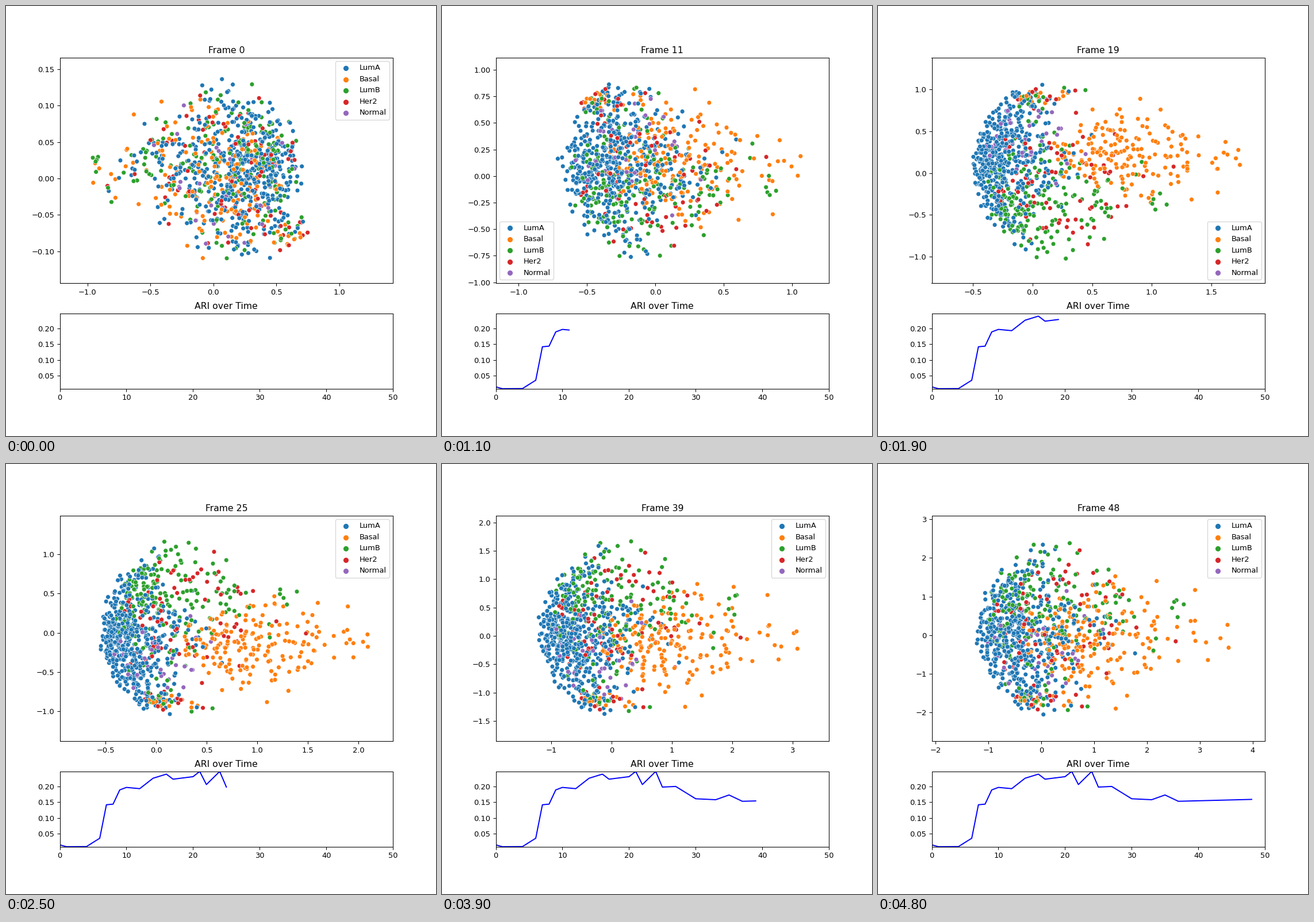
A matplotlib script that plays this animation: 748 by 748 pixels, repeating every 4.9 s.

```python
import numpy as np
import matplotlib.pyplot as plt
from matplotlib.animation import FuncAnimation

FRAMES = 49
NAMES = ["LumA", "Basal", "LumB", "Her2", "Normal"]

# Turning points of the score curve
ARI_EPOCH = [0, 1, 4, 6, 7, 8, 9, 10, 12, 14, 16, 17, 20, 21, 22, 24, 25, 27, 30, 33, 35, 37, 48]
ARI_SCORE = [.015, .0092, .0095, .036, .142, .144, .189, .197, .193, .226, .239, .223,
             .231, .2475, .206, .2475, .198, .2, .161, .158, .173, .153, .159]
ari = np.interp(np.arange(FRAMES), ARI_EPOCH, ARI_SCORE)

# View of the scatter plot at a few epochs
VIEW_EPOCH = [0, 11, 19, 25, 33, 39, 48]
LEFT = [-1.219, -1.168, -0.845, -0.952, -1.527, -1.92, -2.071]
RIGHT = [1.425, 1.272, 1.949, 2.342, 2.941, 3.607, 4.236]
BOTTOM = [-0.144, -1.01, -1.32, -1.38, -1.792, -1.859, -2.751]
TOP = [0.166, 1.114, 1.382, 1.49, 1.797, 2.122, 3.097]

HUB_Y = 0.49
MIXED = np.array([0.13, 0.155])  # spread of a class before it separates

rng = np.random.default_rng(7)


class Cloud:
    """Points around a home, in fractions of the view; grip < 1 resists mixing."""

    def __init__(self, labels, home, spread, grip=1.0):
        self.labels = labels
        self.home, self.spread, self.grip = np.array(home), np.array(spread), grip
        u, v = rng.standard_normal((2, len(labels)))
        # Sharp left edge, long right tail, narrowing towards the sides
        self.z = np.column_stack([u + 0.15 * (u**2 - 1), v * (1.2 - 0.25 * np.abs(u))])

    def points(self, hub, pull, noise):
        p = pull**self.grip
        z = self.z + 0.07 * noise.standard_normal(self.z.shape)
        return hub + p * (self.home - hub) + z * (MIXED + p * (self.spread - MIXED))


clouds = [
    Cloud([0] * 484, (0.21, 0.55), (0.08, 0.155)),
    Cloud([1] * 176, (0.61, 0.57), (0.14, 0.09)),
    Cloud([2] * 182, (0.32, 0.37), (0.10, 0.14)),
    Cloud([3] * 70, (0.39, 0.44), (0.12, 0.13)),
    Cloud([4] * 36, (0.28, 0.64), (0.10, 0.09)),
    # Small side group with members of every class
    Cloud(rng.choice(4, 50), (0.30, 0.87), (0.06, 0.035), grip=0.1),
]
labels = np.concatenate([c.labels for c in clouds])
order = rng.permutation(len(labels))


def layout(i):
    """Point positions as fractions of the view."""
    hub = np.array([np.interp(i, [11, 19], [0.54, 0.36]), HUB_Y])
    pull = np.interp(i, [0, 11, 19, 26, 48], [0.15, 0.5, 1, 1, 0.62])
    noise = np.random.default_rng(100 + i)
    d = np.vstack([c.points(hub, pull, noise) for c in clouds]) - 0.5

    # Pull stray points softly inside the view
    r = np.hypot(*d.T)[:, None]
    d /= (1 + (r / 0.47)**4)**0.25

    # The sign of each axis is arbitrary and flips between epochs
    if i < 5:
        d[:, 0] *= -1
    if i < 5 or 22 <= i < 29 or i >= 36:
        d[:, 1] *= -1
    return d + 0.5


def legend_loc(i):
    if 7 <= i < 15:
        return "lower left"
    return "lower right" if 15 <= i < 22 else "upper right"


fig, (ax, ax_ari) = plt.subplots(
    2, 1, figsize=(8, 8), dpi=93.5, gridspec_kw={"height_ratios": [3, 1]})
dots = ax.scatter(*np.zeros((2, len(order))), s=36, c=[f"C{k}" for k in labels[order]],
                  edgecolors="white", linewidths=0.48)
for k, name in enumerate(NAMES):
    ax.scatter([], [], color=f"C{k}", label=name)
legend = ax.legend(loc="upper right")
title = ax.set_title("Frame 0")

line, = ax_ari.plot([], [], color="blue")
ax_ari.set(xlim=(0, 50), ylim=(ari.min(), ari.max()), title="ARI over Time")


def update(i):
    left, right, bottom, top = (np.interp(i, VIEW_EPOCH, side)
                                for side in (LEFT, RIGHT, BOTTOM, TOP))
    xy = (left, bottom) + layout(i)[order] * (right - left, top - bottom)
    dots.set_offsets(xy)
    ax.set(xlim=(left, right), ylim=(bottom, top))
    legend.set_loc(legend_loc(i))
    title.set_text(f"Frame {i}")
    line.set_data(np.arange(i + 1), ari[:i + 1])
    return dots, line, title, legend


anim = FuncAnimation(fig, update, frames=FRAMES, init_func=lambda: update(0),
                     interval=100, repeat=True, repeat_delay=0)
plt.show()
```
